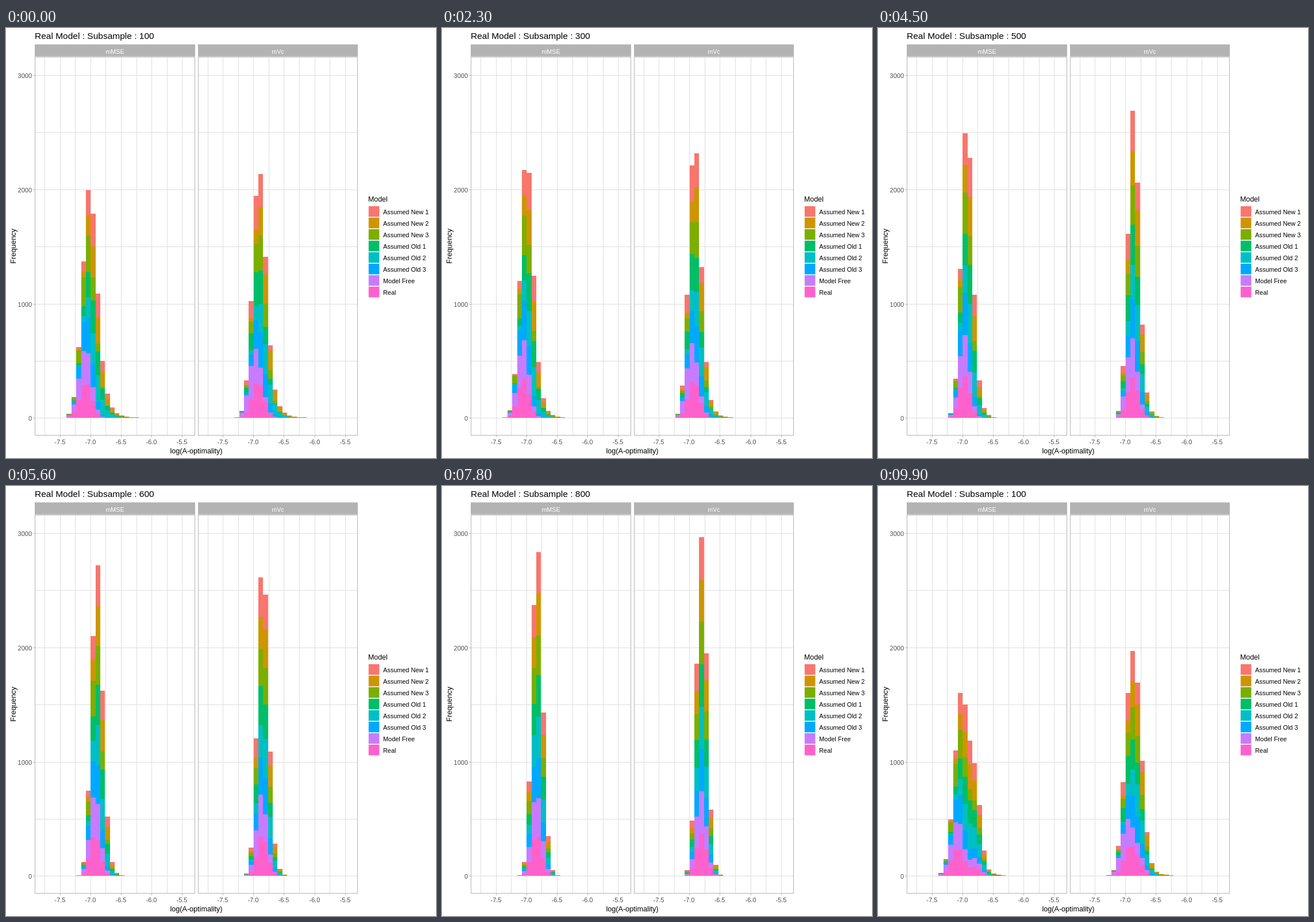
Recreate the animation shown at these times as an HTML page with a canvas. Size 748 px wide and 748 px high, loop 10000 ms.

```html
<!DOCTYPE html>
<html lang="en">
<head>
<meta charset="utf-8">
<title>Real Model histograms</title>
<style>
html, body { margin: 0; width: 100%; height: 100%; overflow: hidden; background: #fff; }
canvas { display: block; width: 748px; height: 748px; }
</style>
</head>
<body>
<canvas id="stage" width="748" height="748"></canvas>
<script>
const ctx = document.getElementById("stage").getContext("2d");
const FONT = '"Liberation Sans", Arial, sans-serif';
const LOOP = 10000, TICK = 100, BINS = 30, RUNS = 1000;
const GRID = "#dedede", FRAME = "#b3b3b3", AXIS = "#4d4d4d";

// stacking order, bottom to top; models of one kind lean alike
const MODELS = [
  { name: "Real", color: "#FF61CC", kind: "real" },
  { name: "Model Free", color: "#C77CFF", kind: "free" },
  { name: "Assumed Old 3", color: "#00A9FF", kind: "third" },
  { name: "Assumed Old 2", color: "#00BFC4", kind: "second" },
  { name: "Assumed Old 1", color: "#00BE67", kind: "first" },
  { name: "Assumed New 3", color: "#7CAE00", kind: "third" },
  { name: "Assumed New 2", color: "#CD9600", kind: "second" },
  { name: "Assumed New 1", color: "#F8766D", kind: "first" }
];

// median: in bins, per subsample size; spread: extra width of small subsamples;
// lean: pull of each kind to the right, which fades as the subsample grows
const PANELS = [
  {
    name: "mMSE", x: 50, w: 279, spread: 0.72,
    median: [9.9, 9.95, 10.07, 10.5, 10.93, 11.36, 11.79, 12.22, 12.72],
    lean: { real: -0.95, free: -1.05, third: -0.72, first: 0, second: 0.18 },
    fade: n => 1 / (1 + Math.exp((n - 0.65) / 0.11))
  },
  {
    name: "mVc", x: 334, w: 278, spread: 0.55,
    median: [11.28, 11.18, 11.15, 11.43, 11.7, 11.97, 12.23, 12.54, 12.87],
    lean: { real: -0.06, free: -0.7, third: 0.26, first: 0, second: 0.8 },
    fade: n => 1 - n
  }
];
const SHIFT = 283.45;

const yOf = v => Math.round(678.4 - v * 0.1988);
const xOf = (v, p) => Math.floor(147.33 + (v + 7) * 106.3 + p * SHIFT);
const edge = (k, p) => Math.floor(64.2 + k * 8.35 + p * SHIFT);
const sum = list => list.reduce((a, v) => a + v, 0);
const clamp = (v, lo, hi) => Math.min(hi, Math.max(lo, v));
const bins = fn => Array.from({ length: BINS }, (_, k) => fn(k));

// normal distribution function, logistic approximation
const normal = z => 1 / (1 + Math.exp(-1.5976 * z - 0.07056 * z ** 3));

// bell with a long right tail that shrinks as n goes from 0 to 1
function below(x, mid, width, n) {
  const u = (x - mid) / width, tail = 0.13 * (1 - n);
  return normal(u > 0 ? u / Math.sqrt(1 + tail * u * u) : u * (1 + tail / 2));
}

// counts per model and bin: tilt the bell per model, then balance
// until the bars keep their heights and every model holds all its runs
function histogram(panel, i) {
  const n = (i + 1) / 10, mid = panel.median[i];
  const width = 1.02 + panel.spread * (1 - n) ** 2;
  const share = bins(k => below(k + 1, mid, width, n) - below(k, mid, width, n));
  const scale = MODELS.length * RUNS / sum(share);
  const rows = MODELS.map(m => bins(k => {
    const tilt = panel.lean[m.kind] * panel.fade(n);
    return share[k] * Math.exp(tilt * clamp(k + 0.5 - mid, -4, 4));
  }));
  for (let pass = 0; pass < 60; pass++) {
    for (const row of rows) {
      const s = RUNS / sum(row);
      row.forEach((v, k) => { row[k] = v * s; });
    }
    share.forEach((v, k) => {
      const s = sum(rows.map(row => row[k]));
      if (s > 0) rows.forEach(row => { row[k] *= v * scale / s; });
    });
  }
  return rows;
}

const STATES = PANELS.map(p => p.median.map((_, i) => histogram(p, i)));

// first tick of each change and its number of steps
const firstTick = i => (i < 2 ? 6 + 12 * i : Math.floor(8.4 + 10.95 * i));
const stepsOf = i => (i < 2 ? 6 : 5);

function poseAt(ms) {
  const tick = Math.floor((ms % LOOP) / TICK);
  let i = 0;
  while (i < 8 && tick >= firstTick(i) + stepsOf(i) - 1) i++;
  const done = Math.max(0, tick - firstTick(i) + 1);
  return { from: i, to: (i + 1) % 9, mix: done / stepsOf(i) };
}

function box(x, y, w, h, color) {
  ctx.fillStyle = color;
  ctx.fillRect(x, y, w, h);
}

function text(s, x, y, size, color = "#000", align = "left") {
  ctx.font = size + "px " + FONT;
  ctx.textAlign = align;
  ctx.fillStyle = color;
  ctx.fillText(s, x, y);
}

function drawBars(p, { from, to, mix }) {
  const a = STATES[p][from], b = STATES[p][to];
  for (let k = 0; k < BINS; k++) {
    const x = edge(k, p), w = edge(k + 1, p) - x;
    let total = 0, low = 678;
    MODELS.forEach((m, j) => {
      total += a[j][k] + (b[j][k] - a[j][k]) * mix;
      const top = Math.min(low, yOf(total));
      if (top < low) box(x, top, w, low - top, m.color);
      low = top;
    });
  }
}

function drawPanel(p, pose) {
  const { name, x, w } = PANELS[p];
  for (let v = 0; v <= 3000; v += 500) box(x, yOf(v), w, 1, GRID);
  for (let v = -7.75; v < -5.4; v += 0.25) box(xOf(v, p), 50, 1, 658, GRID);
  drawBars(p, pose);
  ctx.strokeStyle = FRAME;
  ctx.lineWidth = 1;
  ctx.strokeRect(x + 0.5, 50.5, w - 1, 658);
  box(x, 28.5, w, 21, FRAME);
  text(name, x + w / 2, 45, 10.7, "#fff", "center");
  for (let v = -7.5; v <= -5.5; v += 0.5) {
    const tx = xOf(v, p);
    box(tx, 709, 1, 3, FRAME);
    text(v.toFixed(1), tx, 724, 11, AXIS, "center");
  }
}

function drawLegend() {
  text("Model", 630, 302, 12.4);
  [...MODELS].reverse().forEach((m, i) => {
    const y = 310 + i * 20;
    box(630.8, y, 18.6, 18.5, m.color);
    text(m.name, 656, y + 14, 10.9);
  });
}

function draw(ms) {
  const pose = poseAt(ms);
  const shown = pose.mix >= 0.5 ? pose.to : pose.from;
  box(0, 0, 748, 748, "#fff");
  text("Real Model : Subsample : " + (shown + 1) * 100, 50, 19, 15.5);
  PANELS.forEach((_, p) => drawPanel(p, pose));
  for (let v = 0; v <= 3000; v += 1000) {
    box(47, yOf(v), 3, 1, FRAME);
    text(String(v), 45, yOf(v) + 5, 11, AXIS, "right");
  }
  text("log(A-optimality)", 331, 740, 12.6, "#000", "center");
  ctx.save();
  ctx.translate(17, 379.5);
  ctx.rotate(-Math.PI / 2);
  text("Frequency", 0, 0, 12.9, "#000", "center");
  ctx.restore();
  drawLegend();
}

const start = performance.now();
function loop(now) {
  draw(Math.max(0, now - start));
  requestAnimationFrame(loop);
}
draw(0);
requestAnimationFrame(loop);
</script>
</body>
</html>
```
